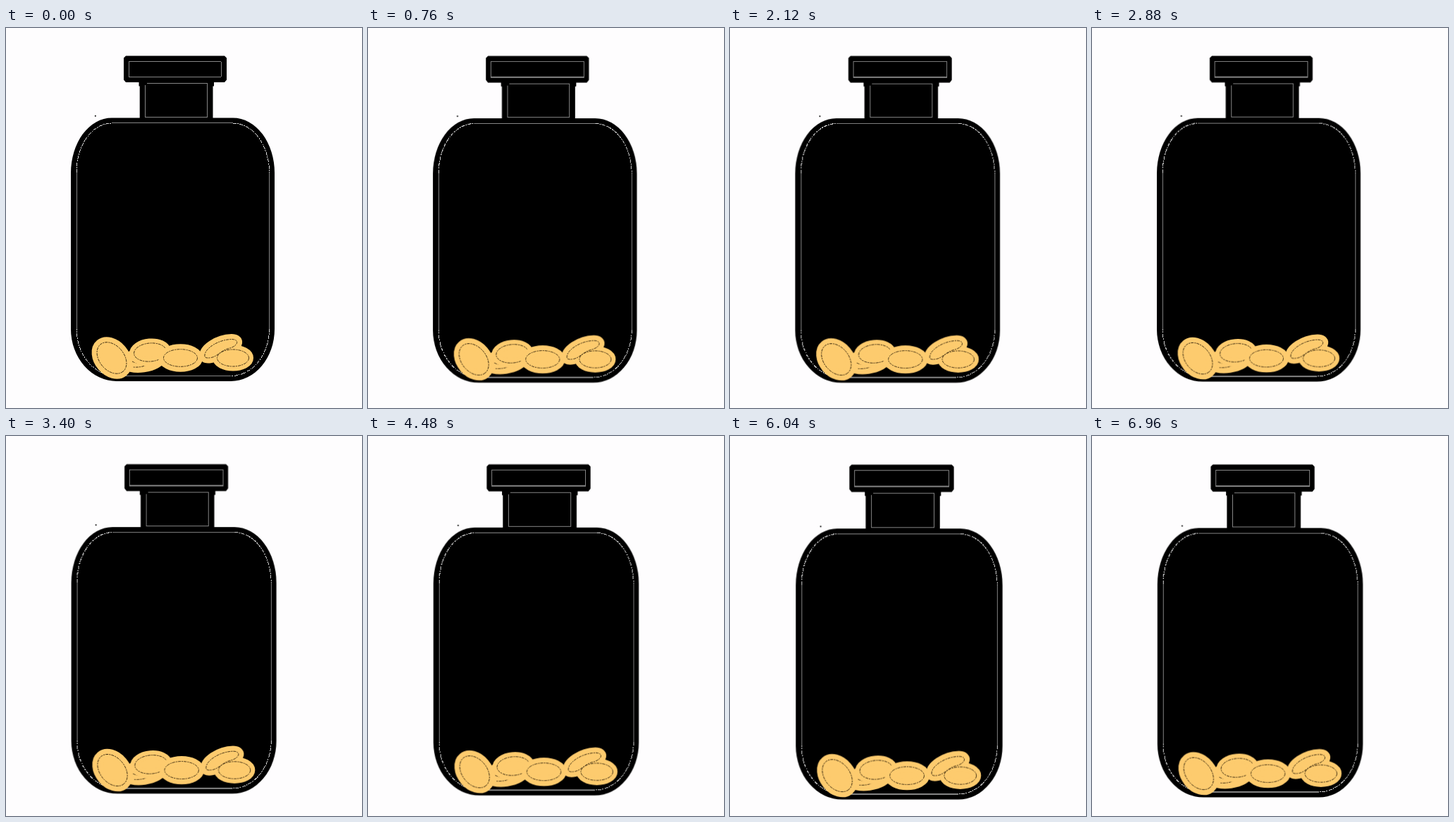
An HTML page that plays this animation: 505x539 px, repeating every 7 s.

```html
<!DOCTYPE html>
<html lang="en">
<head>
<meta charset="utf-8">
<title>Coin jar</title>
<style>
  html, body {
    margin: 0;
    width: 100%;
    height: 100%;
    overflow: hidden;
    background: #fefdfe;
  }
  svg { display: block; }

  .wide, .tall {
    transform-origin: 0 0;
    animation: 7s cubic-bezier(.37, 0, .63, 1) infinite;
  }
  .wide { animation-name: wide; }
  .tall { animation-name: tall; }

  /* The jar breathes from the top left corner, each axis on its own. */
  @keyframes wide {
    0% { transform: scaleX(1); }
    4.286%, 6.286% { transform: scaleX(.998); }
    22.286% { transform: scaleX(1.0145); }
    36.857% { transform: scaleX(.9985); }
    57.143%, 60% { transform: scaleX(1.0115); }
    72% { transform: scaleX(.9985); }
    90.286%, 91.429% { transform: scaleX(1.0165); }
    100% { transform: scaleX(1.0085); }
  }
  @keyframes tall {
    0% { transform: scaleY(1); }
    4.286%, 6.286% { transform: scaleY(.998); }
    17.714% { transform: scaleY(1.016); }
    20.571% { transform: scaleY(1.0145); }
    36.857% { transform: scaleY(.999); }
    57.143%, 60% { transform: scaleY(1.021); }
    72% { transform: scaleY(1.008); }
    90.286%, 91.429% { transform: scaleY(1.032); }
    100% { transform: scaleY(1.023); }
  }

  .line, .curve { fill: none; stroke: #858585; shape-rendering: crispEdges; }
  .curve { stroke: #dcdcdc; stroke-dasharray: 5 1.5 2 1; }
  .coin { fill: #fdcb6e; stroke: #fdcb6e; stroke-width: 15; stroke-linejoin: round; }
  .slim { stroke-width: 13; }
  .rim { fill: none; stroke: #35260e; stroke-width: .9; stroke-dasharray: 4 1.2 2 1; }
</style>
</head>
<body>
<svg width="505" height="539" viewBox="0 0 505 539">
  <defs>
    <ellipse id="left" rx="25" ry="17.5" transform="translate(150 468) rotate(50)"/>
    <ellipse id="back" rx="23" ry="13" transform="translate(204.5 460) rotate(-5)"/>
    <ellipse id="middle" cx="247.5" cy="468" rx="24" ry="12.3"/>
    <path id="leaning" d="M282 466C280 456 300 442 320 441.500C331 441.500 330 450 318 454C306 456 300 466 291 467.500Q283 469 282 466Z"/>
    <ellipse id="right" cx="322" cy="468" rx="22.5" ry="12"/>
  </defs>
  <g class="wide"><g class="tall">
    <circle cx="126.8" cy="124.7" r="1"/>

    <path d="M170 39.500H310L313 42.500V73.500L310 77H295V82.500H293.500V130H189.700V82.500H188.500V77H170L167 73.500V42.500Z"/>
    <path d="M150 127.500H322A59 78 0 0 1 381 205.500V427A62 74 0 0 1 319 501H157A65 74 0 0 1 92 427V205.500A58 78 0 0 1 150 127.500Z"/>

    <path class="line" d="M174.500 47.500H305.500V69.500H174.500ZM197.500 81V126.500H285.500V79M200 78.500H286"/>
    <path class="line" d="M150 135H322M373.500 205V427M100 205V427M157 493.500H319"/>
    <path class="curve" d="M100 205A50 70 0 0 1 150 135M322 135A51.500 70 0 0 1 373.500 205M373.500 427A54.500 66.500 0 0 1 319 493.500M157 493.500A57 66.500 0 0 1 100 427"/>

    <ellipse class="coin" rx="25" ry="10" transform="translate(194 471) rotate(-8)"/>
    <path class="rim" d="M179 473Q190 478 203 475Q196 482 180 481"/>
    <use href="#back" class="coin slim"/><use href="#back" class="rim"/>
    <use href="#middle" class="coin"/><use href="#middle" class="rim"/>
    <use href="#left" class="coin"/><use href="#left" class="rim"/>
    <use href="#leaning" class="coin"/>
    <use href="#right" class="coin slim"/><use href="#right" class="rim"/>
    <use href="#leaning" class="rim"/>
  </g></g>
</svg>
</body>
</html>
```
